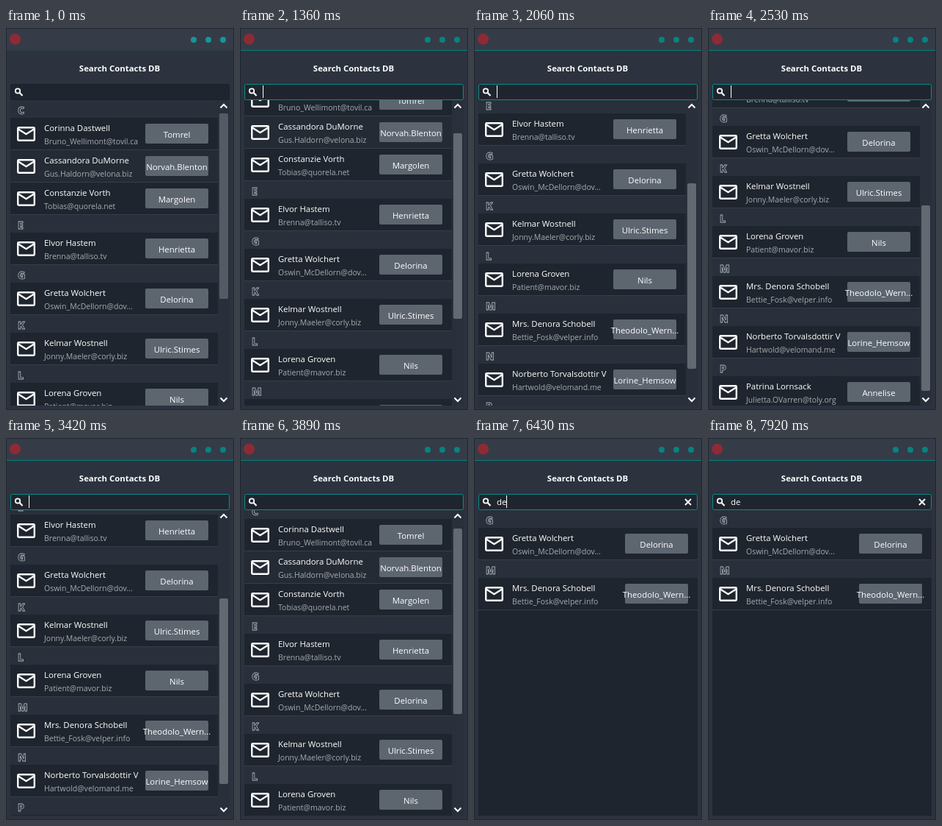
Recreate the animation shown at these times as an HTML page. Size 311x519 px, loop 8000 ms.

```html
<!DOCTYPE html>
<html lang="en">
<head>
<meta charset="utf-8">
<title>Contacts</title>
<style>
html, body { margin: 0; width: 100%; height: 100%; overflow: hidden; background: #2c323e; }
svg { display: block; width: 311px; height: 519px; }
text { font: 11.4px "Open Sans", "Noto Sans", sans-serif; fill: #fff; white-space: pre; }
.title { font-weight: 700; text-anchor: middle; }
.mail { font-size: 10.5px; fill: #a6abb2; }
.nick { text-anchor: middle; }
.letter { font-size: 14px; font-weight: 800; fill: #2a303b; stroke: #b2b7be; stroke-width: .8; }
.line { fill: none; stroke: #fff; }
</style>
</head>
<body>
<svg id="stage" viewBox="0 0 311 519"></svg>
<script>
const LOOP = 8000;
const LIST = { x: 6, y: 98, width: 299, height: 415 };
const HEADER = 24, ROW = 44;

const contacts = [
  ['Corinna Dastwell', 'Bruno_Wellimont@tovil.ca', 'Tomrel'],
  ['Cassandora DuMorne', 'Gus.Haldorn@velona.biz', 'Norvah.Blenton'],
  ['Constanzie Vorth', 'Tobias@quorela.net', 'Margolen'],
  ['Elvor Hastem', 'Brenna@talliso.tv', 'Henrietta'],
  ['Gretta Wolchert', 'Oswin_McDellorn@dov...', 'Delorina'],
  ['Kelmar Wostnell', 'Jonny.Maeler@corly.biz', 'Ulric.Stimes'],
  ['Lorena Groven', 'Patient@mavor.biz', 'Nils'],
  ['Mrs. Denora Schobell', 'Bettie_Fosk@velper.info', 'Theodolo_Wern...'],
  ['Norberto Torvalsdottir V', 'Hartwold@velomand.me', 'Lorine_Hemsow'],
  ['Patrina Lornsack', 'Julietta.OVarren@toly.org', 'Annelise'],
];

// [time, scroll offset]
const scrollKeys = [
  [1200, 0], [1240, 9], [1360, 46], [1650, 102], [2060, 162], [2570, 217],
  [3260, 217], [3300, 207], [3420, 174], [3890, 12], [4060, 0],
];
const caretToggles = [1100, 1570, 2060, 2570, 3070, 3590, 4060, 4590, 5090, 5590,
  6060, 6890, 7420, 7920];

function add(parent, tag, attrs = {}, text) {
  const node = document.createElementNS('http://www.w3.org/2000/svg', tag);
  for (const key in attrs) node.setAttribute(key, attrs[key]);
  if (text !== undefined) node.textContent = text;
  parent.append(node);
  return node;
}
const rect = (parent, x, y, width, height, fill, more) =>
  add(parent, 'rect', { x, y, width, height, fill, ...more });
const line = (parent, d, width) =>
  add(parent, 'path', { d, class: 'line', 'stroke-width': width });
const label = (parent, x, y, cls, text) => add(parent, 'text', { x, y, class: cls }, text);
const show = (node, visible) => node.setAttribute('display', visible ? 'inline' : 'none');

const stage = document.getElementById('stage');
add(add(stage, 'clipPath', { id: 'view' }), 'rect', LIST);

// Window frame and title bar
rect(stage, 0, 0, 311, 519, '#2c323e');
rect(stage, 0, 0, 311, 30, '#353c48');
const titleLine = rect(stage, 1, 30, 309, 1, '#2a3a45');
rect(stage, .5, .5, 310, 518, 'none', { stroke: '#20262f' });
add(stage, 'circle', { cx: 12.5, cy: 15, r: 7.5, fill: '#8e2a35' });
const dots = [256, 276, 296].map(cx => add(stage, 'circle', { cx, cy: 16, r: 4 }));
label(stage, 155, 59, 'title', 'Search Contacts DB');

// Search field
const field = rect(stage, 6.5, 76.5, 298, 21, '#1f252e', { rx: 2 });
add(stage, 'circle', { cx: 16, cy: 85.5, r: 3.2, class: 'line', 'stroke-width': 1.8 });
line(stage, 'M18.3 87.8L22.5 92', 2.2);
const typed = label(stage, 31, 91, '', '');
const caret = rect(stage, 31, 78, 1, 17, '#fff');
const clear = line(stage, 'M288 83l8 8m0 -8l-8 8', 2);

// Contact lists
rect(stage, LIST.x, LIST.y, LIST.width, LIST.height, '#1f252e');
const viewport = add(stage, 'g', { 'clip-path': 'url(#view)' });

function drawContact(parent, y, width, alternate, [name, mail, nick]) {
  const row = add(parent, 'g', { transform: `translate(0 ${y})` });
  if (alternate) rect(row, 6, 0, width, ROW, '#252b34');
  rect(row, 6, ROW - 1, width, 1, '#373e49');
  add(row, 'rect', { x: 16.2, y: 13.2, width: 22.6, height: 17.6, rx: 1.2, class: 'line', 'stroke-width': 2.4 });
  line(row, 'M16.5 15.2L27.5 22.2L38.5 15.2', 2.4);
  label(row, 52, 18, '', name);
  label(row, 52, 36, 'mail', mail);
  const left = width - 93;
  rect(row, left, 8, 86, 27, '#5d656f', { rx: 2 });
  label(row, left + 43, 27, 'nick', nick);
}

function buildList(query) {
  const group = add(viewport, 'g');
  const width = query ? 299 : 283;
  let y = LIST.y, index = 0, letter = '';
  for (const contact of contacts) {
    if (!contact.join(' ').toLowerCase().includes(query)) continue;
    if (contact[0][0] !== letter) {
      letter = contact[0][0];
      rect(group, 6, y, width, HEADER, '#2a303b');
      label(group, 16, y + 19, 'letter', letter);
      y += HEADER;
      index++;
    }
    drawContact(group, y, width, index++ % 2 === 0, contact);
    y += ROW;
  }
  return { group, query, caretX: { '': 31, d: 38, de: 44 }[query], height: y - LIST.y };
}
const lists = ['', 'd', 'de'].map(buildList);
const maxScroll = lists[0].height - LIST.height;

// Scrollbar
const scrollbar = add(stage, 'g');
rect(scrollbar, 289, 98, 16, 415, '#2a303b');
line(scrollbar, 'M292.5 108.5l4.5 -4.5l4.5 4.5M292.5 502.5l4.5 4.5l4.5 -4.5', 2);
const thumb = rect(scrollbar, 291, 116, 12, 252, '#555b64', { rx: 2 });

function scrollAt(t) {
  const next = scrollKeys.findIndex(key => key[0] > t);
  if (next < 1) return 0;
  const [t0, v0] = scrollKeys[next - 1], [t1, v1] = scrollKeys[next];
  return Math.min(maxScroll, Math.round(v0 + (v1 - v0) * (t - t0) / (t1 - t0)));
}

function render(t) {
  const active = t >= 1070, focused = t >= 1100;
  const current = lists[t < 6060 ? 0 : t < 6430 ? 1 : 2];
  const scroll = scrollAt(t);

  titleLine.setAttribute('fill', active ? '#087f7d' : '#2a3a45');
  for (const dot of dots) dot.setAttribute('fill', active ? '#078381' : '#159799');
  field.setAttribute('stroke', focused ? '#0b8b88' : '#1a2029');

  typed.textContent = current.query;
  caret.setAttribute('x', current.caretX);
  show(caret, caretToggles.filter(time => time <= t).length % 2 === 1);
  show(clear, current.query);

  for (const list of lists) show(list.group, list === current);
  lists[0].group.setAttribute('transform', `translate(0 ${-scroll})`);
  show(scrollbar, !current.query);
  thumb.setAttribute('y', 116 + Math.round(scroll / 1.705));
  thumb.setAttribute('fill', t >= 500 && t < 4490 ? '#636971' : '#555b64');
}

const start = performance.now();
function tick() {
  render((performance.now() - start) % LOOP);
  requestAnimationFrame(tick);
}
tick();
</script>
</body>
</html>
```
